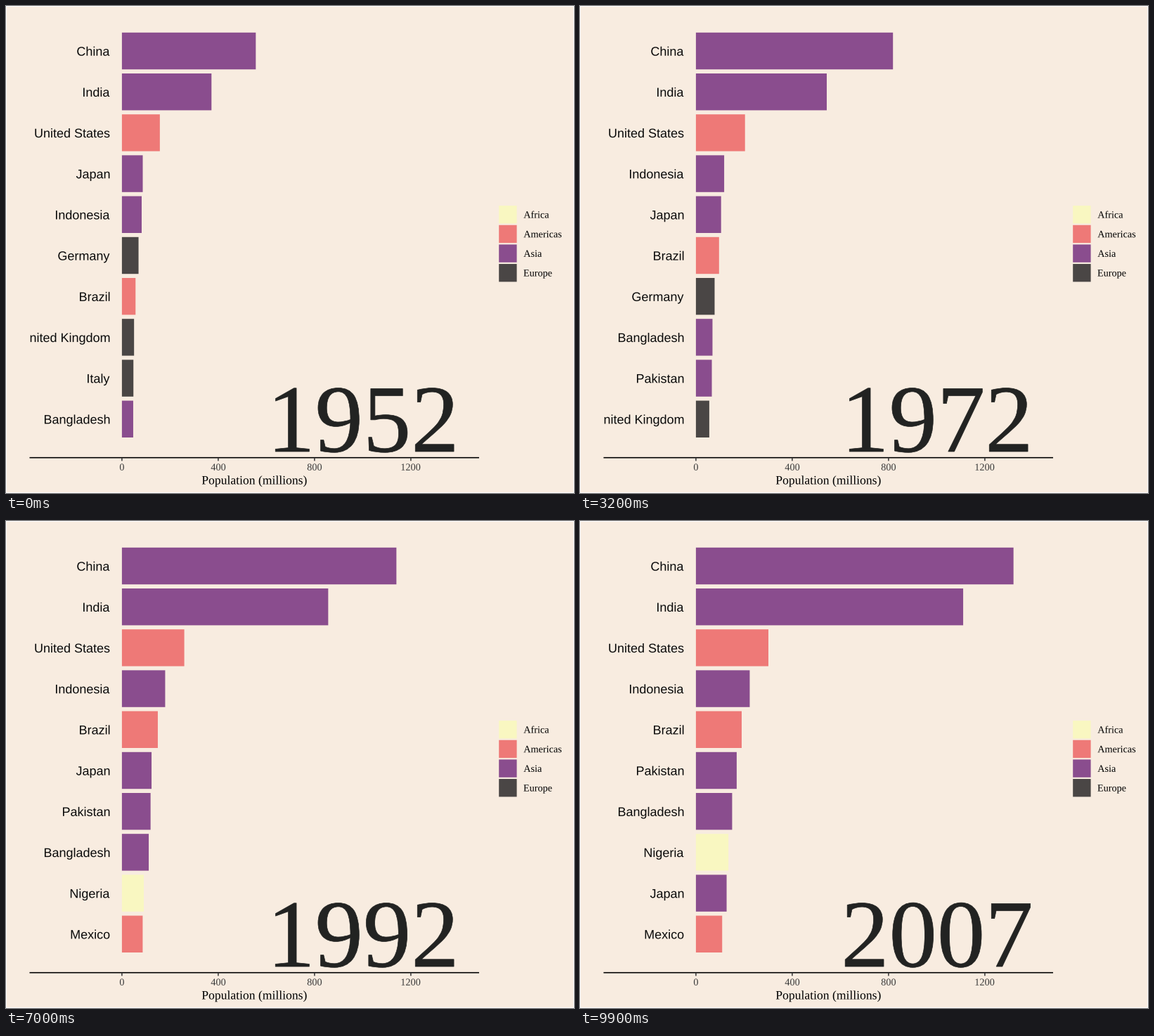
A matplotlib script that plays this animation: 808x693 px, repeating every 10000 ms.

```python
import matplotlib.pyplot as plt
import numpy as np
from matplotlib.animation import FuncAnimation
from matplotlib.patches import PathPatch, Rectangle
from matplotlib.textpath import TextPath
from matplotlib.transforms import Affine2D

W, H, DPI = 808, 693, 64
FRAMES, STEP = 100, 9          # frames per loop, frames per five-year step
YEARS = range(1952, 2008, 5)
X0, SCALE = 164.9, 0.3425      # zero line, pixels per million
Y0, PITCH, BAR = 64, 58.2, 52.4
LEFT, RIGHT, AXIS_Y = 33.5, 673, 642.7
ALPHA = 0.7
SANS, SERIF = "Liberation Sans", "Liberation Serif"

COLORS = {"Africa": "#fafdb4", "Americas": "#ea484b",
          "Asia": "#5c0a6c", "Europe": "#000004"}

# name: continent, then turning points {year: millions}, straight lines between
GROWTH = {
    "China": ("Asia", {1952: 556, 1957: 637, 1962: 666, 1972: 862, 1997: 1230, 2007: 1319}),
    "India": ("Asia", {1952: 372, 1967: 506, 1982: 708, 1997: 959, 2007: 1110}),
    "United States": ("Americas", {1952: 157.5, 2007: 301}),
    "Japan": ("Asia", {1952: 86.5, 1987: 122, 2007: 127.5}),
    "Indonesia": ("Asia", {1952: 82, 1967: 109, 1987: 169, 2007: 223.5}),
    "Germany": ("Europe", {1952: 69, 1972: 78.7, 1987: 77.7}),
    "Brazil": ("Americas", {1952: 56.6, 1972: 101, 2007: 190}),
    "United Kingdom": ("Europe", {1952: 50.4, 1972: 56.1}),
    "Italy": ("Europe", {1952: 47.7, 1972: 54.4}),
    "Bangladesh": ("Asia", {1952: 46.9, 1962: 56.3, 1977: 80.4, 1987: 103.8,
                            1997: 123.3, 2007: 150.4}),
    "Pakistan": ("Asia", {1952: 41.3, 1962: 53.1, 1977: 78.1, 1982: 91.2, 2007: 169.3}),
    "Mexico": ("Americas", {1952: 30, 1972: 56, 1992: 88, 2007: 109}),
    "Nigeria": ("Africa", {1952: 33, 1972: 53.7, 1982: 73, 1992: 93, 2007: 135}),
}


def top_ten(year):
    """Map each of the ten largest countries to (rank, population)."""
    pops = {name: np.interp(year, list(pts), list(pts.values()))
            for name, (_, pts) in GROWTH.items()}
    order = sorted(pops, key=pops.get, reverse=True)[:10]
    return {name: (rank, pops[name]) for rank, name in enumerate(order)}


STATES = [top_ten(year) for year in YEARS]

fig = plt.figure(figsize=(W / DPI, H / DPI), dpi=DPI, facecolor="white")
ax = fig.add_axes([0, 0, 1, 1])
ax.set_xlim(0, W)
ax.set_ylim(H, 0)
ax.axis("off")


def box(x, y, w, h, color, **kw):
    return ax.add_patch(Rectangle((x, y), w, h, fc=color, lw=0, snap=False, **kw))


def place(patch, x, y):
    patch.set_transform(Affine2D().scale(1, -1).translate(x, y) + ax.transData)


def text(s, x, y, size, family, color="black", align=None, **kw):
    """Draw s on baseline y; align None puts the pen origin at x."""
    path = TextPath((0, 0), s, size=size, prop={"family": family})
    ext = path.get_extents()
    shift = {None: 0, "left": ext.x0, "center": (ext.x0 + ext.x1) / 2,
             "right": ext.x1}[align]
    path = path.transformed(Affine2D().translate(-shift, 0))
    patch = ax.add_patch(PathPatch(path, fc=color, **{"lw": 0, **kw}))
    place(patch, x, y)
    return patch


# Fixed parts
box(1, 1, W - 2, H - 2, "#f8ece0", zorder=0)
box(LEFT, AXIS_Y - 0.8, RIGHT - LEFT, 1.6, "black")
for value in range(0, 1201, 400):
    x = X0 + value * SCALE
    box(x - 0.75, AXIS_Y, 1.5, 4.6, "#333333")
    text(str(value), x, 660.8, 14.3, SERIF, "#3a3a3a", "center")
text("Population (millions)", 353.2, 680.5, 17.6, SERIF, align="center")
for i, (name, color) in enumerate(COLORS.items()):
    y = 296.8 + 27.65 * i
    box(701.2, y - 12.7, 25.4, 25.4, color, alpha=ALPHA)
    text(name, 736.4, y + 4.8, 14.2, SERIF, align="left")

# Moving parts
panel = Rectangle((LEFT, 0), RIGHT - LEFT, AXIS_Y, transform=ax.transData)
bars, labels = {}, {}
for name, (continent, _) in GROWTH.items():
    bars[name] = box(X0, 0, 0, BAR, COLORS[continent], alpha=ALPHA)
    labels[name] = text(name, 0, 0, 18, SANS, "#0a0a0a", "right", zorder=30)
    labels[name].set_clip_path(panel)
year_texts = [text(str(year), 371.2, 634, 136.7, SERIF, "#222322",
                   ec="#222322", lw=0.8, zorder=40) for year in YEARS]


def draw(frame):
    k, rest = divmod(frame, STEP)
    t = rest / STEP
    now = STATES[k]
    # leaving countries hold still until the step ends
    after = STATES[k + 1] if rest else now
    for name in GROWTH:
        shown = name in now
        bars[name].set_visible(shown)
        labels[name].set_visible(shown)
        if not shown:
            continue
        rank, pop = now[name]
        rank2, pop2 = after.get(name, now[name])
        y = Y0 + PITCH * (rank + (rank2 - rank) * t)
        bars[name].set_y(y - BAR / 2)
        bars[name].set_width(SCALE * (pop + (pop2 - pop) * t))
        bars[name].set_zorder(10 + rank)
        place(labels[name], 147.4, y + 6.7)
    years = {k + (t > 0.5)}
    if now.keys() - after.keys():
        years.add(k)
    for i, label in enumerate(year_texts):
        label.set_visible(i in years)
    return [*bars.values(), *labels.values(), *year_texts]


anim = FuncAnimation(fig, draw, frames=FRAMES, interval=100,
                     init_func=lambda: draw(0), repeat=True, repeat_delay=0)
plt.show()
```
